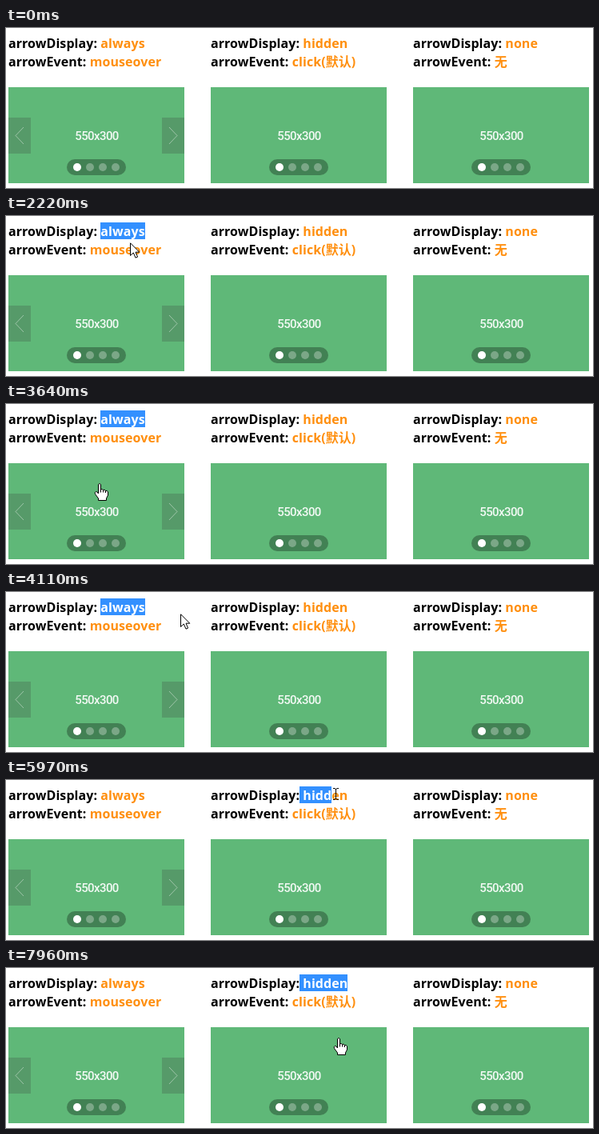
Animation, 734 px wide and 200 px high, one loop 8 s. Source, as an HTML page with a canvas:

```html
<!DOCTYPE html>
<html lang="zh-CN">
<head>
<meta charset="utf-8">
<style>
html, body { margin: 0; width: 100%; height: 100%; overflow: hidden; background: #fff; }
canvas { display: block; }
</style>
</head>
<body>
<canvas width="734" height="200"></canvas>
<script>
const ctx = document.querySelector('canvas').getContext('2d');
const LOOP = 8000;
const TEXT_FONT = 'bold 16px "Open Sans", "Noto Sans CJK SC", "Noto Sans CJK", sans-serif';
const ORANGE = '#ff8f0f';

const columns = [
  { x: 3, display: 'always', event: 'mouseover' },
  { x: 256, display: 'hidden', event: 'click(默认)' },
  { x: 509, display: 'none', event: '无' }
];

// Pointer moves: start, end, x, y; it rests in between
const moves = [
  [300, 500, 187, 20],
  [1000, 1340, 128, 19],
  [1610, 1670, 118, 19],
  [2010, 2220, 155, 33],
  [2220, 2810, 157, 106],
  [3060, 3180, 99, 104],
  [3180, 3340, 54, 110],
  [3340, 3840, 124, 98],
  [3890, 4110, 218, 27],
  [4520, 5130, 379, 19],
  [5310, 5460, 371, 18],
  [5740, 6350, 431, 17],
  [6510, 6880, 429, 125],
  [7320, 7730, 438, 48],
  [7900, 7960, 416, 87]
];

const arrowShape = new Path2D('M.5 .8V16.5L4.3 13L7 19.2L9.6 18.1L7 12.2H11.8Z');
const handShape = new Path2D('M-1.5 1.5Q0 -.5 1.5 1.5V8Q3 6.5 4.5 8.5Q6 7.3 7.5 9.5' +
  'Q9.5 8.5 10.5 11V15L8.5 19V21.5H-1.5V19L-5.5 13.5Q-6.5 11 -4.5 10.5Q-3 10.3 -1.5 13Z');
const handFolds = new Path2D('M1.5 8V11.5M4.5 8.5V11.5M7.5 9.5V12');
const beamShape = new Path2D('M-4 -6.5H-2L-.5 -5.5L1 -6.5H3M-.5 -6V7M-4 7.5H-2L-.5 6.5L1 7.5H3');

const progress = (t, from, to) => Math.max(0, Math.min(1, (t - from) / (to - from)));
const easeOut = p => 1 - (1 - p) ** 2.5;
const smooth = p => p * p * (3 - 2 * p);
const textWidth = s => ctx.measureText(s).width;

function pointerAt(t) {
  let x = 184, y = -20;
  for (const [from, to, toX, toY] of moves) {
    const p = easeOut(progress(t, from, to));
    x += (toX - x) * p;
    y += (toY - y) * p;
  }
  return { x: Math.round(x), y: Math.round(y) };
}

// Nearest gap between letters to a given x
function snapToLetter(text, left, x) {
  let best = left;
  for (let i = 1; i <= text.length; i++) {
    const edge = left + textWidth(text.slice(0, i));
    if (Math.abs(edge - x) < Math.abs(best - x)) best = edge;
  }
  return best;
}

function drawLine(label, value, x, y, valueColor = ORANGE, labelColor = '#000') {
  ctx.fillStyle = labelColor;
  ctx.fillText(label, x, y);
  ctx.fillStyle = valueColor;
  ctx.fillText(value, x + textWidth(label), y);
}

function selectionAt(t, pointer) {
  const [first, second] = columns;
  if (t >= 1000 && t < 4370) {
    const left = first.x + textWidth('arrowDisplay: ');
    const from = t < 1670 ? snapToLetter(first.display, left, pointer.x) : left;
    return { column: first, from, to: left + textWidth(first.display) };
  }
  if (t >= 5740) {
    const from = second.x + textWidth('arrowDisplay:');
    const aim = t < 6350 ? pointer.x - 6 : 431;
    return { column: second, from, to: snapToLetter(' ' + second.display, from, aim) };
  }
  return null;
}

function drawSelection({ column, from, to }) {
  const left = Math.round(from), width = Math.round(to) - left;
  ctx.save();
  ctx.beginPath();
  ctx.rect(left, 8, width, 21);
  ctx.clip();
  ctx.fillStyle = '#3390ff';
  ctx.fillRect(left, 8, width, 21);
  drawLine('arrowDisplay: ', column.display, column.x, 25, '#fff', '#fff');
  ctx.restore();
}

function drawCaption(cx) {
  ctx.save();
  ctx.font = '500 15px Roboto, "Liberation Sans", sans-serif';
  ctx.letterSpacing = '-0.6px';
  ctx.textAlign = 'center';
  ctx.fillStyle = '#f2f9f4';
  ctx.fillText('550x300', cx, 139.5);
  ctx.restore();
}

function drawDots(x) {
  ctx.fillStyle = 'rgba(0,0,0,.3)';
  ctx.beginPath();
  ctx.roundRect(x, 164, 74, 20, 10);
  ctx.fill();
  for (let i = 0; i < 4; i++) {
    ctx.fillStyle = i ? 'rgba(255,255,255,.3)' : '#fff';
    ctx.beginPath();
    ctx.arc(x + 13 + i * 16, 174, 5, 0, 7);
    ctx.fill();
  }
}

function drawArrowButton(x, dir) {
  ctx.fillStyle = 'rgba(68,84,72,.3)';
  ctx.fillRect(x, 112, 28, 45);
  ctx.strokeStyle = 'rgba(255,255,255,.42)';
  ctx.lineWidth = 1;
  ctx.beginPath();
  const cx = x + 14;
  ctx.moveTo(cx - dir * 5, 124);
  ctx.lineTo(cx + dir * 5, 134.5);
  ctx.lineTo(cx - dir * 5, 145);
  ctx.stroke();
}

function drawSlider(x, reveal) {
  ctx.fillStyle = '#5fb878';
  ctx.fillRect(x, 74, 220, 120);
  drawCaption(x + 110.5);
  drawDots(x + 73);
  if (reveal <= 0) return;
  const inset = Math.round(10 * (1 - reveal));
  ctx.globalAlpha = reveal;
  drawArrowButton(x + inset, -1);
  drawArrowButton(x + 192 - inset, 1);
  ctx.globalAlpha = 1;
}

function drawPointer({ x, y }, t) {
  const overSlider = y >= 74 && columns.some(c => x >= c.x && x < c.x + 220);
  const overText = t > 4500 && x >= 256 && x < 437 && y < 55;
  ctx.save();
  ctx.translate(x, y);
  ctx.strokeStyle = '#000';
  ctx.lineWidth = 1;
  if (overText) {
    ctx.stroke(beamShape);
  } else {
    const shape = overSlider ? handShape : arrowShape;
    ctx.fillStyle = '#fff';
    ctx.fill(shape);
    ctx.stroke(shape);
    if (overSlider) ctx.stroke(handFolds);
  }
  ctx.restore();
}

function draw(t) {
  ctx.fillStyle = '#fff';
  ctx.fillRect(0, 0, 734, 200);
  ctx.font = TEXT_FONT;
  ctx.letterSpacing = '0.07px';
  const hover = smooth(progress(t, 6800, 6990)) - smooth(progress(t, 7460, 7730));
  columns.forEach((c, i) => {
    drawLine('arrowDisplay: ', c.display, c.x, 25);
    drawLine('arrowEvent: ', c.event, c.x, 48);
    drawSlider(c.x, [1, hover, 0][i]);
  });
  const pointer = pointerAt(t);
  const selection = selectionAt(t, pointer);
  if (selection) drawSelection(selection);
  drawPointer(pointer, t);
}

const start = performance.now();
function tick() {
  draw((performance.now() - start) % LOOP);
  requestAnimationFrame(tick);
}
tick();
</script>
</body>
</html>
```
